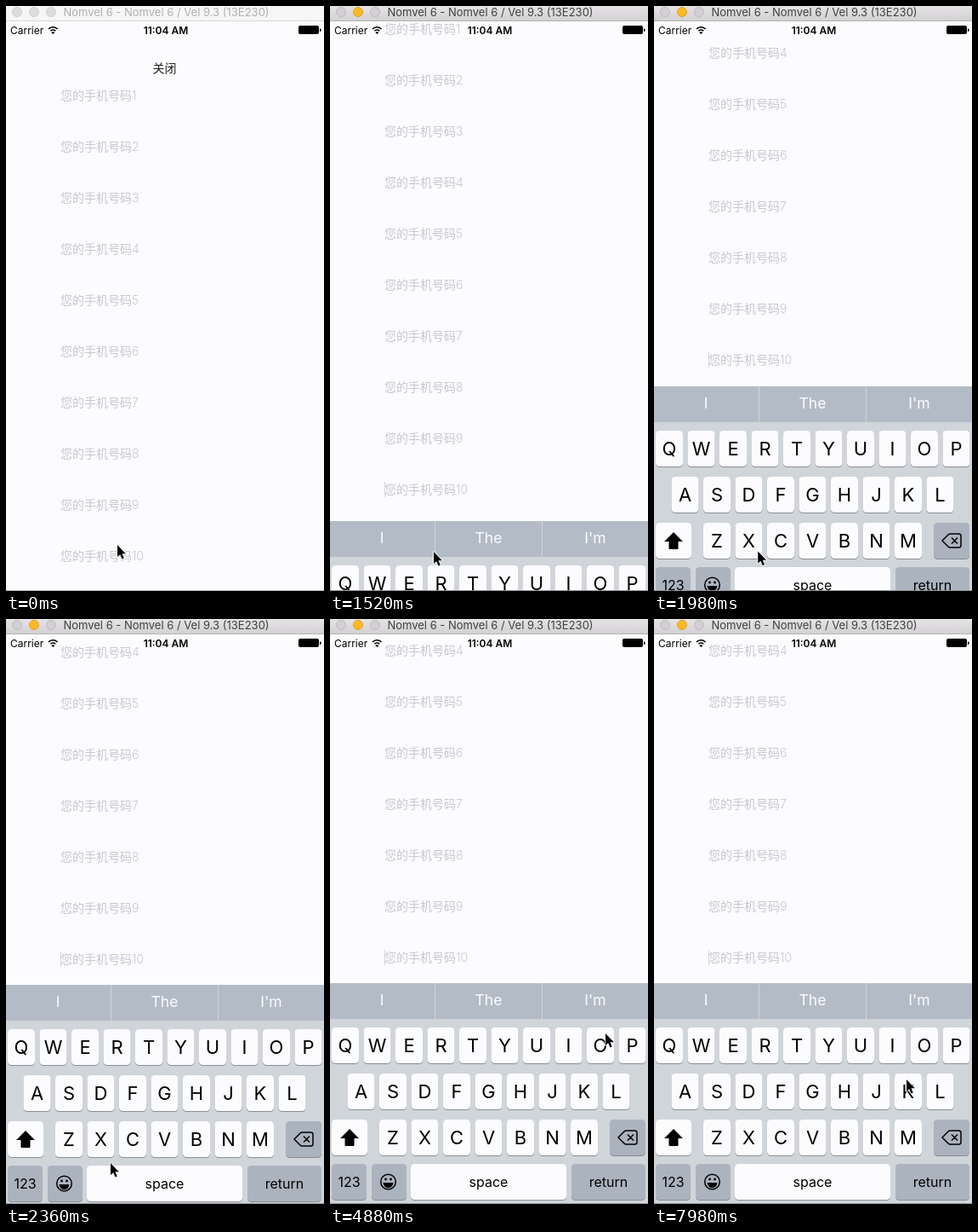
These frames come from a looping animation (374x686 px, 8000 ms). An HTML page with a canvas:

```html
<!DOCTYPE html>
<html lang="zh-CN">
<head>
<meta charset="utf-8">
<style>
  html, body { margin: 0; width: 100%; height: 100%; overflow: hidden; background: #fcfcff; }
  canvas { display: block; }
</style>
</head>
<body>
<canvas id="stage" width="374" height="686"></canvas>
<script>
const W = 374, H = 686, LOOP = 8000;
const ctx = document.getElementById('stage').getContext('2d');
const FONT = 'Inter, "Noto Sans CJK SC", "Noto Sans CJK", sans-serif';

const ACTIVATE_AT = 600;   // window gains focus
const KEYBOARD_AT = 1353;  // keyboard starts to rise
const KEYBOARD_HEIGHT = 259, CONTENT_SHIFT = 248;
const SPRING = 6.8;        // critically damped, per second

// Pointer stops: time, x, y
const POINTER = [
  [0, 131, 632], [900, 122, 640], [1800, 122, 640], [2360, 123, 638],
  [2920, 219, 485], [3300, 219, 485], [4700, 324, 486], [5000, 324, 486],
  [5700, 268, 610], [6500, 230, 600], [7300, 275, 575], [7900, 297, 540], [8000, 297, 540]
];

function text(string, x, baseline, size, color, align = 'center', weight = 400) {
  ctx.font = `${weight} ${size}px ${FONT}`;
  ctx.textAlign = align;
  ctx.fillStyle = color;
  ctx.fillText(string, x, baseline);
}

function rect(x, y, w, h, color) {
  ctx.fillStyle = color;
  ctx.fillRect(x, y, w, h);
}

function roundRect(x, y, w, h, r, color) {
  ctx.fillStyle = color;
  ctx.beginPath();
  ctx.roundRect(x, y, w, h, r);
  ctx.fill();
}

function disc(x, y, r, fill, stroke) {
  ctx.beginPath();
  ctx.arc(x, y, r, 0, 2 * Math.PI);
  if (fill) { ctx.fillStyle = fill; ctx.fill(); }
  if (stroke) { ctx.strokeStyle = stroke; ctx.stroke(); }
}

function shape(path, x, y, fill, stroke, width = 1) {
  const outline = new Path2D(path);
  ctx.save();
  ctx.translate(x, y);
  ctx.lineWidth = width;
  ctx.lineJoin = 'round';
  if (stroke) { ctx.strokeStyle = stroke; ctx.stroke(outline); }
  if (fill) { ctx.fillStyle = fill; ctx.fill(outline); }
  ctx.restore();
}

function rise(time) {
  const s = Math.max(0, time - KEYBOARD_AT) / 1000 * SPRING;
  return 1 - (1 + s) * Math.exp(-s);
}

function pointerAt(time) {
  const i = POINTER.findIndex(stop => stop[0] > time);
  const [t0, x0, y0] = POINTER[i - 1], [t1, x1, y1] = POINTER[i];
  const u = (time - t0) / (t1 - t0), e = u * u * (3 - 2 * u);
  return [x0 + (x1 - x0) * e, y0 + (y1 - y0) * e];
}

function drawContent(shift, editing) {
  text('关闭', 186.5, 78 - shift, 14, '#222');
  for (let i = 0; i < 10; i++) {
    text('您的手机号码' + (i + 1), 64, 110 + 60 * i - shift, 14, '#c7c7cd', 'left', 300);
  }
  if (editing) rect(64, 636 - shift, 1, 18, '#d4d4e2');
}

function drawStatusBar() {
  text('Carrier', 5, 32.5, 12, '#000', 'left');
  ctx.strokeStyle = '#000';
  ctx.lineWidth = 1.6;
  for (const r of [4, 7.2]) {
    ctx.beginPath();
    ctx.arc(55.3, 32, r, -Math.PI * 0.76, -Math.PI * 0.24);
    ctx.stroke();
  }
  shape('M0 0L-2 -2Q0 -3.6 2 -2Z', 55.3, 33, '#000');
  text('11:04 AM', 188, 32.5, 12, '#000', 'center', 600);
  roundRect(344, 23, 24, 10, 2, '#000');
  roundRect(369, 26.5, 1.5, 3.5, 0.7, '#000');
}

function drawTitleBar(active) {
  const shade = ctx.createLinearGradient(0, 0, 0, 17);
  shade.addColorStop(0, active ? '#e5e3e5' : '#f6f6f6');
  shade.addColorStop(1, active ? '#d3d1d3' : '#f6f6f6');
  rect(0, 0, W, 17, shade);
  rect(0, 17, W, 1, active ? '#b4b2b4' : '#d8d8d8');
  ctx.lineWidth = 1;
  [13, 33, 53].forEach((x, i) => {
    const lit = active && i === 1;
    disc(x, 7, 5.5, lit ? '#fdb924' : active ? '#d2d0d2' : '#dcdcdc',
      lit ? '#e0a02c' : active ? '#bcbabc' : '#d0d0d0');
  });
  text('Nomvel 6 - Nomvel 6 / Vel 9.3 (13E230)', 188.5, 12, 13, active ? '#404040' : '#b0b0b0');
}

function drawKey(x, y, w, label, size = 22, fill = '#fcfcff') {
  roundRect(x, y + 1, w, 42, 4.5, '#8b8e92');
  roundRect(x, y, w, 42, 4.5, fill);
  text(label, x + w / 2, y + 21 + size * 0.365, size, '#000');
}

function drawLetters(letters, x, y) {
  [...letters].forEach((letter, i) => drawKey(x + 37.5 * i, y, 32, letter));
}

function drawKeyboard(top) {
  const grey = '#abb3bf';
  rect(0, top, W, KEYBOARD_HEIGHT, '#d0d5da');
  rect(0, top, W, 42, '#b3bcc6');
  rect(123, top, 1, 42, '#ccd3da');
  rect(249, top, 1, 42, '#ccd3da');
  text('I', 61, top + 25.5, 17.5, '#fcfcff');
  text('The', 186.5, top + 25.5, 17.5, '#fcfcff');
  text("I'm", 312, top + 25.5, 17.5, '#fcfcff');

  drawLetters('QWERTYUIOP', 2, top + 52);
  drawLetters('ASDFGHJKL', 20.5, top + 106);
  drawLetters('ZXCVBNM', 58, top + 160);

  drawKey(2, top + 160, 42, '');
  shape('M0 -10L11 1H5.5V9Q5.5 10 4.5 10H-4.5Q-5.5 10 -5.5 9V1H-11Z', 23, top + 181, '#000');
  drawKey(329, top + 160, 42, '', 22, grey);
  shape('M-11 0L-4 -7Q-3 -8 -1.5 -8H8.5Q11 -8 11 -5.5V5.5Q11 8 8.5 8H-1.5Q-3 8 -4 7Z' +
    'M0 -3.5L7 3.5M7 -3.5L0 3.5', 350, top + 181, null, '#000', 1.5);

  const last = top + 212;
  drawKey(2, last, 41, '123', 16, grey);
  drawKey(49, last, 41, '', 16, grey);
  drawKey(95, last, 183, 'space', 16);
  drawKey(284, last, 87, 'return', 16, grey);
  ctx.lineWidth = 1.5;
  disc(68.5, last + 21, 8.8, null, '#000');
  disc(65.5, last + 18, 1.4, '#000');
  disc(71.5, last + 18, 1.4, '#000');
  shape('M-6 0H6Q5 6 0 6Q-5 6 -6 0Z', 68.5, last + 22, '#000');
}

function drawPointer([x, y]) {
  shape('M0 0V14L3.2 11.2L5.5 16.5L7.7 15.5L5.5 10.3H9.8Z', x, y, '#000', '#fff', 1.6);
}

function draw(time) {
  const progress = rise(time), editing = time >= KEYBOARD_AT;
  rect(0, 0, W, H, '#fcfcff');
  drawContent(Math.round(CONTENT_SHIFT * progress), editing);
  drawStatusBar();
  if (editing) drawKeyboard(Math.round(H - KEYBOARD_HEIGHT * progress));
  drawTitleBar(time >= ACTIVATE_AT);
  rect(0, 685, W, 1, editing ? '#8c8e92' : '#b4b4b8');
  drawPointer(pointerAt(time));
}

const start = performance.now();
function frame() {
  draw((performance.now() - start) % LOOP);
  requestAnimationFrame(frame);
}
frame();
</script>
</body>
</html>
```
